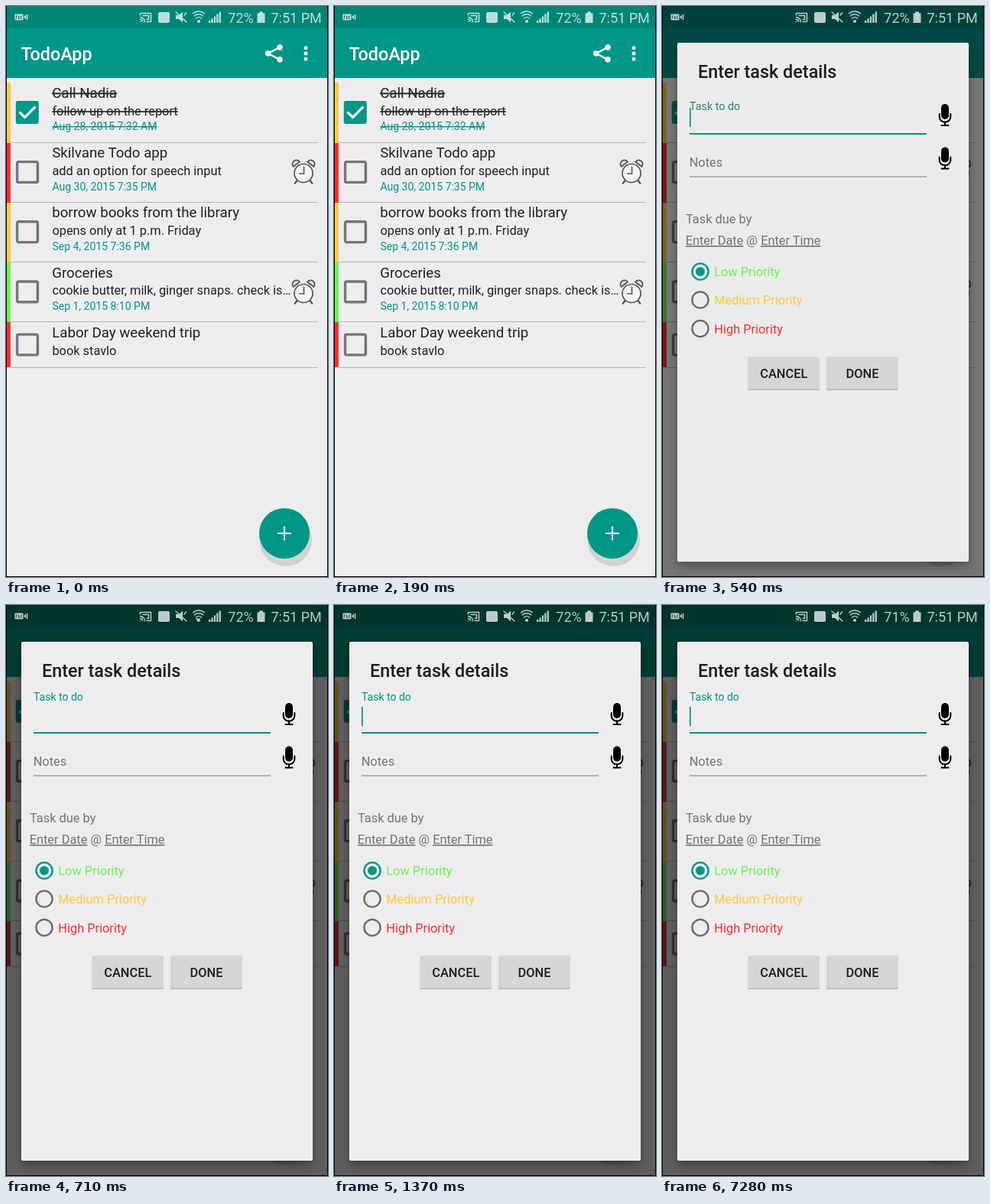
An HTML page that plays this animation: 421 px wide and 746 px high, repeating every 8000 ms.

```html
<!DOCTYPE html>
<html lang="en">
<head>
<meta charset="utf-8">
<title>Todo list</title>
<style>
  html, body { margin: 0; width: 100%; height: 100%; overflow: hidden; background: #000; }
  svg { display: block; width: 421px; height: 746px; font-family: Roboto, "Liberation Sans", sans-serif; }
  text { white-space: pre; }

  .teal { fill: #009688; }
  .red { fill: #fb2d2d; }
  .yellow { fill: #fdcb36; }
  .green { fill: #6df350; }
  .grey { fill: #737373; }

  .head { font-size: 23.39px; font-weight: 500; }
  .title { font-size: 18.71px; fill: #212121; }
  .note { font-size: 16.37px; fill: #212121; }
  .date { font-size: 14.03px; fill: #009688; }
  .body { font-size: 16.37px; }
  .button { font-size: 16.37px; font-weight: 500; fill: #1d1d1d; text-anchor: middle; }
  .done text { text-decoration: line-through; text-decoration-thickness: 1.2px; }
  .link { text-decoration: underline; text-decoration-thickness: 1px; }
  .line { fill: none; stroke-linecap: round; stroke-linejoin: round; }
  .status { fill: #fff; stroke: #fff; opacity: .74; }
  .status text { font-size: 18px; stroke: none; }

  /* Every state change is a hard cut on one shared 8 s clock. */
  .anim, .anim-all * { animation: 8s step-end infinite; }
  .fab { animation-name: fab; }
  .rest { animation-name: rest; }
  .lift { animation-name: lift; }
  .scrim { animation-name: scrim; }
  .dialog { animation-name: dialog; }
  .panel { animation-name: panel; }
  .hint { animation-name: hint; }
  .caret { animation-name: caret; }
  .data { animation-name: data; }
  .full { animation-name: full; }
  .drained { animation-name: drained; }

  @keyframes fab { 0% { fill: #009688; } 4.5% { fill: #008c7e; } 6.75%, 100% { fill: #009688; } }
  @keyframes rest { 0% { opacity: 1; } 4.5% { opacity: 0; } 6.75%, 100% { opacity: 1; } }
  @keyframes lift { 0% { opacity: 0; } 4.5% { opacity: 1; } 6.75%, 100% { opacity: 0; } }
  @keyframes scrim { 0% { opacity: 0; } 6.75% { opacity: .5; } 8.875%, 100% { opacity: .6; } }
  @keyframes dialog { 0% { visibility: hidden; } 6.75%, 100% { visibility: visible; } }
  @keyframes panel { 0% { fill: #ebebeb; } 8.875%, 100% { fill: #ededef; } }
  @keyframes hint {
    0% { transform: translate(36px, 136.5px) scale(1.02); fill: #2b857b; }
    8.875%, 100% { transform: translate(36px, 124.5px); fill: #009688; }
  }
  @keyframes caret { 0% { opacity: 1; } 8.875% { opacity: 0; } 17.125%, 100% { opacity: 1; } }
  @keyframes data { 0% { opacity: 0; } 8.875% { opacity: 1; } 11.125%, 100% { opacity: 0; } }
  @keyframes full { 0% { opacity: 1; } 91%, 100% { opacity: 0; } }
  @keyframes drained { 0% { opacity: 0; } 91%, 100% { opacity: 1; } }
</style>
</head>
<body>
<svg viewBox="0 0 421 746">
  <defs>
    <rect id="box" x="14.6" y="-13.4" width="26.8" height="26.8" rx="2" fill="none" stroke="#757575" stroke-width="3.4"/>
    <g id="clock" class="line" stroke="#555557" stroke-width="1.7">
      <circle r="12" cy="1.5" fill="#f3f3f4"/>
      <path d="M-13.5-7a5.2 5.2 0 0 1 8.5-6.5zM13.5-7a5.2 5.2 0 0 0-8.5-6.5z" fill="#dcdcde"/>
      <path d="M-8.5 11l-2.7 3.6M8.5 11l2.7 3.6" stroke-width="2.4"/>
      <path d="M.5-6.5V2H-5.5"/>
    </g>
    <g id="mic">
      <rect x="-5" y="-14" width="10" height="20" rx="5"/>
      <path class="line" d="M-7.3-1v4a7.3 6.6 0 0 0 14.6 0v-4M0 10v4M-4.5 14h9" stroke="#000" stroke-width="2"/>
    </g>
    <circle id="ring" r="10.6" fill="none" stroke-width="2.4"/>
    <g id="key">
      <rect y="1.6" width="94" height="42.4" rx="2" fill="#b9b9bb"/>
      <rect width="94" height="42.6" rx="2" fill="#d6d6d7"/>
    </g>
    <clipPath id="screen"><path d="M1 0H420V745H1z"/></clipPath>
  </defs>

  <rect width="421" height="746"/>
  <g clip-path="url(#screen)">
    <rect width="421" height="746" fill="#ededef"/>
    <rect width="421" height="94" class="teal"/>
    <rect width="421" height="29" fill="#008577"/>
    <text class="head" x="19.6" y="71" fill="#fff">TodoApp</text>
    <g fill="#fff">
      <path class="line" d="M358 54L342.500 62L358 70" stroke="#fff" stroke-width="2.3"/>
      <circle cx="358" cy="54" r="3.7"/><circle cx="342.500" cy="62" r="3.7"/><circle cx="358" cy="70" r="3.7"/>
      <circle cx="392" cy="54.700" r="2.5"/><circle cx="392" cy="62" r="2.5"/><circle cx="392" cy="69.300" r="2.5"/>
    </g>

    <path d="M6 178.500H408M6 256.500H408M6 334.500H408M6 412.500H408M6 472.500H408" stroke="#b6b6b8"/>
    <rect class="yellow" x="1" y="100" width="5" height="79"/>
    <rect class="red" x="1" y="179" width="5" height="78"/>
    <rect class="yellow" x="1" y="257" width="5" height="78"/>
    <rect class="green" x="1" y="335" width="5" height="78"/>
    <rect class="red" x="1" y="413" width="5" height="59"/>

    <rect class="teal" x="12.800" y="124" width="30" height="30" rx="3"/>
    <path d="M17.500 138.500L24.500 145.500L38.500 131.500" fill="none" stroke="#ededef" stroke-width="3.2"/>
    <use href="#box" y="217"/><use href="#box" y="295.200"/>
    <use href="#box" y="373.400"/><use href="#box" y="442.500"/>
    <use href="#clock" x="389" y="217"/><use href="#clock" x="389" y="374"/>

    <g class="done">
      <text class="title" x="60.200" y="120">Call Nadia</text>
      <text class="note" x="60.400" y="143">follow up on the report</text>
      <text class="date" x="60.400" y="162">Aug 28, 2015 7:32 AM</text>
    </g>
    <text class="title" x="60.200" y="198.200">Skilvane Todo app</text>
    <text class="note" x="60.400" y="221">add an option for speech input</text>
    <text class="date" x="60.400" y="240.500">Aug 30, 2015 7:35 PM</text>
    <text class="title" x="60.200" y="276.400">borrow books from the library</text>
    <text class="note" x="60.400" y="299.200">opens only at 1 p.m. Friday</text>
    <text class="date" x="60.400" y="318.700">Sep 4, 2015 7:36 PM</text>
    <text class="title" x="60.200" y="354.600">Groceries</text>
    <text class="note" x="60.400" y="377.300">cookie butter, milk, ginger snaps. check is…</text>
    <text class="date" x="60.400" y="397">Sep 1, 2015 8:10 PM</text>
    <text class="title" x="60.200" y="432.800">Labor Day weekend trip</text>
    <text class="note" x="60.400" y="456">book stavlo</text>

    <circle class="anim rest" cx="365.500" cy="697.500" r="34.500" fill="#d2d2d4"/>
    <circle class="anim lift" cx="366" cy="703" r="36" fill="#d2d2d4"/>
    <circle class="anim fab" cx="364" cy="689" r="33"/>
    <path d="M355 689H373M364 680V698" stroke="#fff" stroke-width="2"/>

    <rect class="anim scrim" width="421" height="746"/>
  </g>

  <g class="status">
    <g stroke="none">
      <rect x="11.500" y="10.500" width="11" height="8" rx="1"/>
      <path d="M23 14.500L26 11.500V17.500zM26.800 11H28.300V18H26.800z"/>
      <path d="M13.500 13v3.500M13.500 13h1.500M16.500 13v3.500h1.500M16.500 14.700h1.300M20.800 13h-1.300v3.500h1.300" fill="none" stroke="#00564d" stroke-width=".9"/>
      <rect x="199" y="8" width="15" height="14" rx="2"/>
      <path d="M222 12h4l5-4.500v14l-5-4.500h-4z"/>
      <path d="M265 19h2.300v3H265zM268.400 16.500h2.300V22h-2.300zM271.800 13.500h2.300V22h-2.300zM275.200 10.500h2.300V22h-2.300zM278.600 7.500h2.300V22h-2.300z"/>
      <path d="M331 7.500h5v2h2.500V22h-10V9.500H331z"/>
      <circle cx="252" cy="20" r="2"/>
      <path class="anim data" d="M248 17.500h6l-3 4.500z"/>
    </g>
    <g class="line" stroke-width="1.5">
      <path d="M175.500 12V9.500H189.500V20.500H184M175.500 20.500h.1M175.500 17.500a3 3 0 0 1 3 3M175.500 14.700a6 6 0 0 1 6 6M179 12.500h7.500v5H184"/>
      <path d="M222 8L236 21M235.500 9L233 12"/>
      <path d="M248.500 16.200a5 5 0 0 1 7 0M246.300 13a8.300 8.300 0 0 1 11.400 0M244.500 9.800a11.200 11.200 0 0 1 15 0"/>
    </g>
    <text class="anim full" x="290.300" y="22">72%</text>
    <text class="anim drained" x="290.300" y="22">71%</text>
    <text x="346.500" y="22">7:51 PM</text>
  </g>

  <g class="anim dialog">
    <rect class="anim panel" x="20" y="48" width="381" height="678" rx="2" style="filter: drop-shadow(0 6px 6px rgba(0,0,0,.32))"/>
    <text class="head" x="47" y="93.500" fill="#1d1d1d">Enter task details</text>

    <text class="anim hint date">Task to do</text>
    <rect class="anim caret teal" x="36" y="133" width="1.700" height="25"/>
    <rect class="teal" x="36" y="166" width="310" height="2"/>
    <text class="body grey" x="35.700" y="209.500">Notes</text>
    <rect x="36" y="222.500" width="310" height="1.100" fill="#858587"/>
    <use href="#mic" x="370" y="142"/><use href="#mic" x="370" y="198.500"/>

    <text class="body grey" x="31" y="284">Task due by</text>
    <text class="body grey" x="30.700" y="312"><tspan class="link">Enter Date</tspan> @ <tspan class="link">Enter Time</tspan></text>

    <use href="#ring" x="50" y="347" stroke="#009688"/>
    <circle class="teal" cx="50" cy="347" r="6"/>
    <use href="#ring" x="50" y="384" stroke="#6b6b6b"/>
    <use href="#ring" x="50" y="421.500" stroke="#6b6b6b"/>
    <text class="body green" x="68.300" y="353">Low Priority</text>
    <text class="body yellow" x="68.300" y="390">Medium Priority</text>
    <text class="body red" x="68.300" y="427.500">High Priority</text>

    <use href="#key" x="112" y="458"/><use href="#key" x="215" y="458"/>
    <text class="button" x="159.300" y="486">CANCEL</text>
    <text class="button" x="262" y="486">DONE</text>
  </g>
</svg>
</body>
</html>
```
